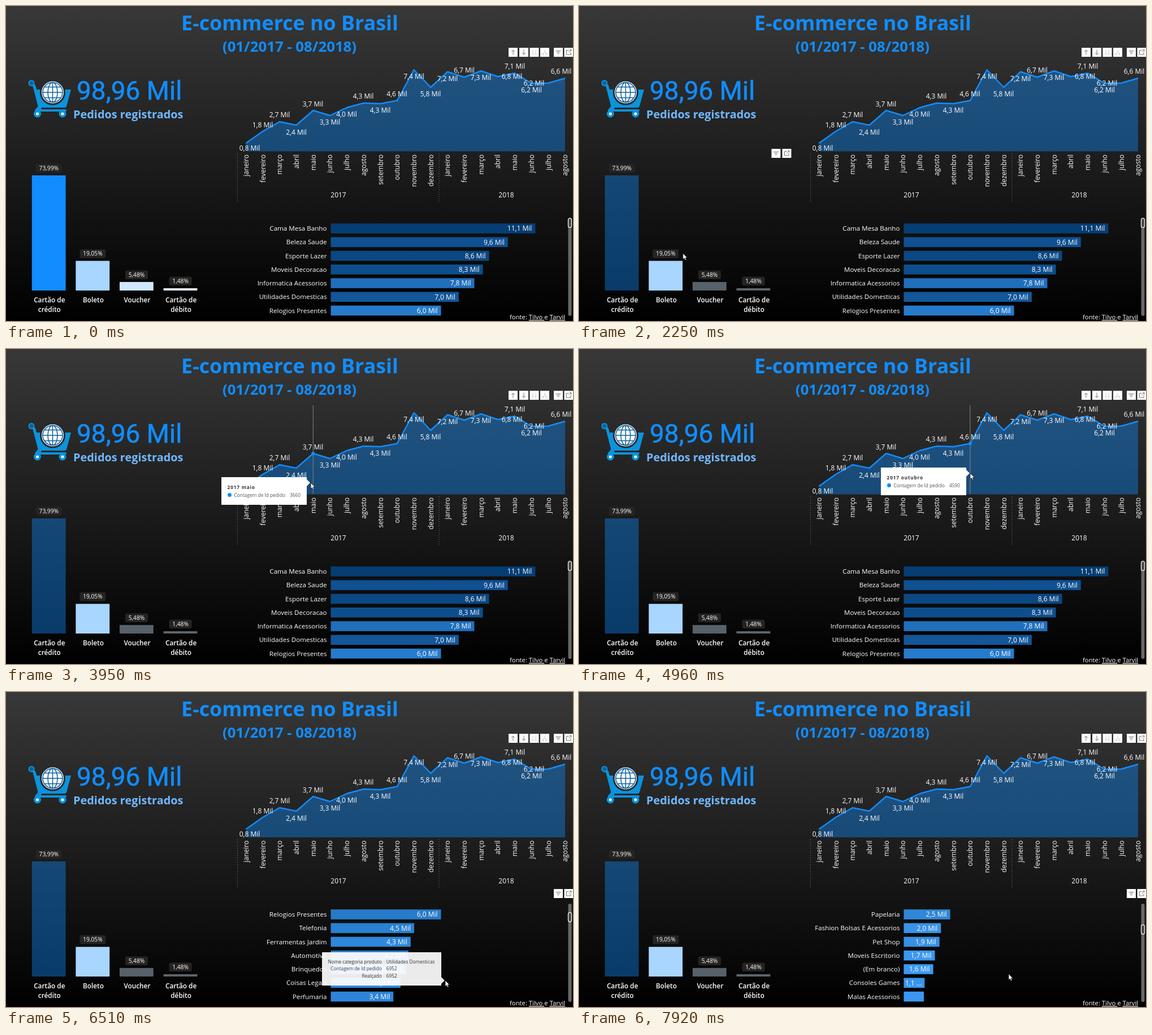
Write an HTML page that moves like this. It is 1003 by 558 pixels and loops after 7990 ms.

```html
<!DOCTYPE html>
<html lang="pt-BR">
<head>
<meta charset="utf-8">
<title>E-commerce no Brasil</title>
<style>
  html, body { margin: 0; width: 100%; height: 100%; overflow: hidden; background: #000; }
  #stage {
    position: relative; width: 1003px; height: 558px; overflow: hidden;
    background: linear-gradient(#383838, #000);
    font-family: "Open Sans", "Noto Sans", sans-serif;
  }
  svg { position: absolute; inset: 0; display: block; }
  text { fill: #fff; font-size: 12px; text-anchor: middle; }
  .end { text-anchor: end; }
  .start { text-anchor: start; }
  .blue { fill: #118dff; font-weight: 700; }
  .pct { font-size: 10.3px; }
  .pay { font-size: 11.8px; font-weight: 600; }
  .month { font-weight: 500; }
  .category { font-size: 11.6px; }
  .tip {
    position: absolute; padding: 11px; background: #fff; color: #3a3a3a;
    font-size: 8.3px; line-height: 12.5px; white-space: pre;
  }
  .grid { display: grid; grid-template-columns: auto auto; column-gap: 8px; }
  .grid span:nth-child(odd) { text-align: right; }
  .series { line-height: 13.5px; color: #555; }
  .series b { display: block; letter-spacing: .8px; color: #333; }
  .series i {
    display: inline-block; width: 7px; height: 7px; margin-right: 5px;
    border-radius: 50%; background: #118dff; vertical-align: -.5px;
  }
  .series span { margin-left: 8px; }
  .tip::after { content: ""; position: absolute; border: 6px solid transparent; }
  .grid::after { right: -12px; bottom: 3px; border-left-color: #fff; }
  .series::after { right: -12px; top: 4px; border-left-color: #fff; }
  .grid.toRight::after { right: auto; left: -12px; bottom: 5px; border-color: transparent #fff transparent transparent; }
</style>
</head>
<body>
<div id="stage">
  <svg id="board" width="1003" height="558">
    <defs><clipPath id="rowsClip"><path d="M400 381H990V552H400Z"/></clipPath></defs>
    <g id="cart" fill="none" stroke="#0c93dc" stroke-linecap="round" stroke-linejoin="round">
      <path d="M50 148H115L107 178Q106 180 103 180H60Z" fill="#0c93dc" stroke="none"/>
      <path d="M45 136L50 142L60 181" stroke-width="5"/>
      <path d="M59 178L53 185H105" stroke-width="4"/>
      <circle cx="45" cy="136.500" r="4.500" fill="#0b5f9c" stroke-width="2"/>
      <circle cx="82.500" cy="153" r="21" fill="#fff" stroke="#252a30" stroke-width="3"/>
      <g stroke="#0b5f9c" stroke-width="1.500">
        <circle cx="82.500" cy="153" r="17.500"/>
        <ellipse cx="82.500" cy="153" rx="8.500" ry="17.500"/>
        <path d="M82.500 135.500V170.500M65 153H100M68 143.500H97M68 162.500H97"/>
      </g>
      <g fill="#fff" stroke-width="4"><circle cx="55.500" cy="191" r="4.500"/><circle cx="100" cy="191" r="4.500"/></g>
    </g>
  </svg>
  <div id="tip" class="tip"></div>
  <svg width="1003" height="558">
    <path id="cursor" d="M0 0V10.600L2.400 8.400L4.100 12L6 11.200L4.400 7.700H7.700Z"
          fill="#fff" stroke="#111" stroke-width=".8"/>
  </svg>
</div>
<script>
const LOOP = 7990;
const $ = id => document.getElementById(id);
const board = $('board'), tip = $('tip'), cursor = $('cursor');

function add(parent, name, attrs, content) {
  const node = document.createElementNS('http://www.w3.org/2000/svg', name);
  for (const key in attrs) node.setAttribute(key, attrs[key]);
  if (content) node.textContent = content;
  return parent.appendChild(node);
}
const label = (parent, x, y, content, cls = '', more = {}) =>
  add(parent, 'text', { x, y, dy: '.36em', class: cls, ...more }, content);
const rect = (parent, x, y, width, height, fill, more = {}) =>
  add(parent, 'rect', { x, y, width, height, fill, ...more });
const show = (node, on) => { node.style.visibility = on ? 'visible' : 'hidden'; };

// Headings
label(board, 502, 30, 'E-commerce no Brasil', 'blue', { style: 'font-size:35.8px' });
label(board, 501.5, 72, '(01/2017 - 08/2018)', 'blue', { style: 'font-size:25.8px' });
label(board, 125, 149, '98,96 Mil', 'start',
  { style: 'font:46px Roboto,sans-serif;fill:#118dff;stroke:#118dff;stroke-width:.6px' });
label(board, 119, 192, 'Pedidos registrados', 'start',
  { style: 'font-size:19.9px;font-weight:700;fill:#71b8ff' });

const footer = label(board, 891, 551, 'fonte: ', 'start', { style: 'font-size:11.3px' });
const link = { 'text-decoration': 'underline' };
add(footer, 'tspan', link, 'Tilvo ');
add(footer, 'tspan', {}, 'e ');
add(footer, 'tspan', link, 'Tarvil');

// Header buttons of the visuals
const GLYPHS = {
  up: 'M8 12.500V4M5 7L8 4L11 7',
  down: 'M8 3.500V12M5 9L8 12L11 9',
  twin: 'M5.500 3.500V12M4 10.500L5.500 12L7 10.500M10.500 3.500V12M9 10.500L10.500 12L12 10.500',
  fork: 'M8 3.500V7L4.500 12M8 7L11.500 12M4.500 9.500V12H7M11.500 9.500V12H9',
  filter: 'M3.500 5.500H12.500M5 8H11M6.500 10.500H9.500',
  focus: 'M8 4.500H4V12H11.500V8M9.500 3.500H12.500V6.500M12.500 3.500L8 8'
};
function buttons(y, list) {
  const group = add(board, 'g');
  for (const [x, glyph] of list) {
    rect(group, x, y, 16, 16, '#fff');
    const faint = glyph === 'twin' || glyph === 'fork';
    add(group, 'path', { d: GLYPHS[glyph], transform: `translate(${x} ${y})`, fill: 'none', stroke: faint ? '#ccc' : '#777' });
  }
  return group;
}

// Monthly orders
const MONTHS = ['janeiro', 'fevereiro', 'março', 'abril', 'maio', 'junho', 'julho', 'agosto',
  'setembro', 'outubro', 'novembro', 'dezembro'];
const lineY = [243, 222, 205, 211, 185, 194, 180, 172, 173, 167.5, 113, 144, 116.5, 126, 115, 125, 119, 137, 136.5, 128];
const counts = { 4: 3660, 5: 3217, 6: 3969, 7: 4293, 8: 4243, 9: 4590 };
const monthX = i => 424.5 + 29.71 * i;
const line = lineY.map((y, i) => `${monthX(i)} ${y}`).join('L');
add(board, 'path', { d: `M${line}V257.500H424.500Z`, fill: '#118dff', 'fill-opacity': .4 });
add(board, 'path', { d: 'M' + line, fill: 'none', stroke: '#118dff', 'stroke-width': 2.4, 'stroke-linejoin': 'round' });

const hover = add(board, 'g');
add(hover, 'path', { d: 'M0 100V257', stroke: '#858585' });
const hoverDot = add(hover, 'circle', { r: 3, fill: '#118dff' });

const valueLabels = '0,8 431 252|1,8 454 211|2,7 484 193|2,4 513.5 223.5|3,7 543 173.5|3,3 573 206|' +
  '4,0 602.5 192|4,3 632 160|4,3 662 185|4,6 691.5 155.5|7,4 721.5 125|5,8 751 155.5|7,2 781 129|' +
  '6,7 810.5 114|7,3 840 127|6,8 895 125|7,1 900 107|6,2 929.5 149|6,2 934 137|6,6 982 116';
for (const entry of valueLabels.split('|')) {
  const [value, x, y] = entry.split(' ');
  label(board, x, y, value + ' Mil');
}
lineY.forEach((_, i) =>
  label(board, 0, 0, MONTHS[i % 12], 'end month', { transform: `translate(${monthX(i)} 263) rotate(-90)` }));
for (const x of [409.5, 766])
  add(board, 'path', { d: `M${x} 261V346`, stroke: '#8a8a8a', 'stroke-dasharray': '1 3' });
label(board, 588, 335, '2017');
label(board, 885, 335, '2018');
buttons(74, [[889, 'up'], [908, 'down'], [926.5, 'twin'], [945, 'fork'], [969, 'filter'], [987.5, 'focus']]);

// Payment types
const payments = [
  [73.99, '#118dff', 'Cartão de', 'crédito'], [19.05, '#a9d6ff', 'Boleto'],
  [5.48, '#d0e8ff', 'Voucher'], [1.48, '#e3f2ff', 'Cartão de', 'débito']
];
const payBars = payments.map(([share, fill, ...names], i) => {
  const x = 45.8 + 77.6 * i, mid = x + 30, height = share * 2.757, top = 504 - height;
  const pill = share < 10 ? 40 : 46;
  const bar = rect(board, x, top, 59.8, height, fill);
  rect(board, mid - pill / 2, top - 20.5, pill, 15.5, '#252423', { rx: 3 });
  label(board, mid, top - 12.7, share.toFixed(2).replace('.', ',') + '%', 'pct');
  names.forEach((name, row) => label(board, mid + 1, 521 + 17 * row, name, 'pay'));
  return bar;
});
const payButtons = buttons(253, [[340.5, 'filter'], [359.5, 'focus']]);

// Product categories
const ROW = 24.25;
const categories = [
  ['Cama Mesa Banho', 11.115, '#063e74'], ['Beleza Saude', 9.62, '#0f5093'],
  ['Esporte Lazer', 8.6, '#0b4781'], ['Moveis Decoracao', 8.262, '#0e4e8d'],
  ['Informatica Acessorios', 7.8, '#206fbd'], ['Utilidades Domesticas', 6.952, '#135699'],
  ['Relogios Presentes', 5.99, '#277bcb'], ['Telefonia', 4.53, '#2a80d2'],
  ['Ferramentas Jardim', 4.34, '#2f88dc'], ['Automotivo', 4.22, '#2a7ed0'],
  ['Brinquedos', 4.1, '#2e86da'], ['Coisas Legais', 3.79, '#2f88dc'],
  ['Perfumaria', 3.4, '#2d84d8'], ['Bebes', 3.06, '#2f87da'],
  ['Eletronicos', 2.76, '#3890e6'], ['Papelaria', 2.52, '#3087d8'],
  ['Fashion Bolsas E Acessorios', 2.02, '#3992e8'], ['Pet Shop', 1.94, '#3790e5'],
  ['Moveis Escritorio', 1.69, '#3b97f0'], ['(Em branco)', 1.6, '#3b99f4'],
  ['Consoles Games', 1.13, '#3896ee'], ['Malas Acessorios', 1.09, '#3a98f2']
];
const rows = add(add(board, 'g', { 'clip-path': 'url(#rowsClip)' }), 'g');
categories.forEach(([name, amount, fill], i) => {
  const y = 394 + ROW * i, width = amount * 32.56;
  rect(rows, 574.5, y - 8.8, width, 17.6, fill);
  label(rows, 567.5, y, name, 'end category');
  const value = amount.toFixed(1).replace('.', ',');
  if (amount > 1.5) label(rows, 568.5 + width, y, value + ' Mil', 'end');
  else if (amount > 1.1) label(rows, 577, y, value + ' ...', 'start');
});
rect(board, 994.5, 375, 6, 174, '#686868', { rx: 3 });
const thumb = rect(board, 994.5, 376, 6, 16.5, '#4a4a4a', { rx: 3, stroke: '#fff', 'stroke-width': 1.2 });
const rowButtons = buttons(349, [[969, 'filter'], [987.5, 'focus']]);

// Timeline
const path = [
  [480, 23, 541], [1230, 139, 480], [1300, 144, 473], [2040, 144, 473], [2720, 318, 321],
  [3560, 539, 237], [4280, 539, 237], [4960, 692, 220], [5290, 692, 220], [5630, 695, 456],
  [5890, 695, 456], [6090, 695, 461], [6440, 777, 511], [6720, 777, 511], [7130, 760, 499.5]
];
const scrolls = [[0, 0], [6450, 3], [6500, 6], [6790, 9], [7060, 12], [7530, 15]];
const ramp = (t, from, to) => Math.min(1, Math.max(0, (t - from) / (to - from)));

function cursorAt(t) {
  const next = path.findIndex(([time]) => time > t);
  if (next < 0) return path[path.length - 1].slice(1);
  if (next === 0) return path[0].slice(1);
  const [t0, x0, y0] = path[next - 1], [t1, x1, y1] = path[next];
  const p = ramp(t, t0, t1), eased = p * p * (3 - 2 * p);
  return [x0 + (x1 - x0) * eased, y0 + (y1 - y0) * eased];
}

let tipKey;
function setTip(cls, html) {
  if (tipKey === cls + html) return;
  tipKey = cls + html;
  tip.className = 'tip ' + cls;
  tip.innerHTML = html;
}
const gridTip = pairs => pairs.map(([name, value]) => `<span>${name}</span><span>${value}</span>`).join('');
function placeTip(edges) {
  for (const side of ['left', 'right', 'top', 'bottom'])
    tip.style[side] = side in edges ? edges[side] + 'px' : 'auto';
}

function drawTip(t, x, y, month) {
  const onPay = t >= 1700 && t < 2040, onLine = t >= 3950 && t < 5290, onRows = t >= 5890 && t < 6700;
  show(tip, onPay || onLine || onRows);
  tip.style.opacity = onRows ? 1 - ramp(t, 6495, 6700) : 1;
  if (onPay) {
    setTip('grid toRight', gridTip([['Tipo de pagamento', 'Boleto'], ['%GT Contagem de Tipo de pagamento', '19,05%']]));
    placeTip({ left: x + 11, bottom: 547 - y });
  } else if (onLine) {
    setTip('series', `<b>2017 ${MONTHS[month]}</b><i></i>Contagem de Id pedido<span>${counts[month]}</span>`);
    placeTip({ right: 1010 - x, top: y - 10 });
  } else if (onRows) {
    const [name, amount] = categories[Math.round((y - 394) / ROW)];
    const count = Math.round(amount * 1000);
    setTip('grid', gridTip([['Nome categoria produto', name], ['Contagem de Id pedido', count], ['Realçado', count]]));
    placeTip({ right: 1010.5 - x, bottom: 549 - y });
  }
}

function render(t) {
  const [x, y] = cursorAt(t);
  show(cursor, t >= 480);
  cursor.setAttribute('transform', `translate(${x} ${y})`);

  const dim = 1 - .6 * ramp(t, 1970, 2110);
  payBars.forEach((bar, i) => { if (i !== 1) bar.setAttribute('opacity', dim); });
  show(payButtons, t >= 540 && x < 376);
  show(rowButtons, t > 5290 && y > 345);

  const month = Math.max(0, Math.round((x - monthX(0)) / 29.71));
  show(hover, t > 2720 && x > 409 && y > 100 && y < 257);
  hover.setAttribute('transform', `translate(${monthX(month)} 0)`);
  hoverDot.setAttribute('cy', lineY[month]);

  const top = scrolls.filter(([time]) => time <= t).pop()[1];
  rows.setAttribute('transform', `translate(0 ${-ROW * top})`);
  thumb.setAttribute('y', 376 + 2.43 * top);
  drawTip(t, x, y, month);
}

const start = performance.now();
function tick() {
  render((performance.now() - start) % LOOP);
  requestAnimationFrame(tick);
}
tick();
</script>
</body>
</html>
```
